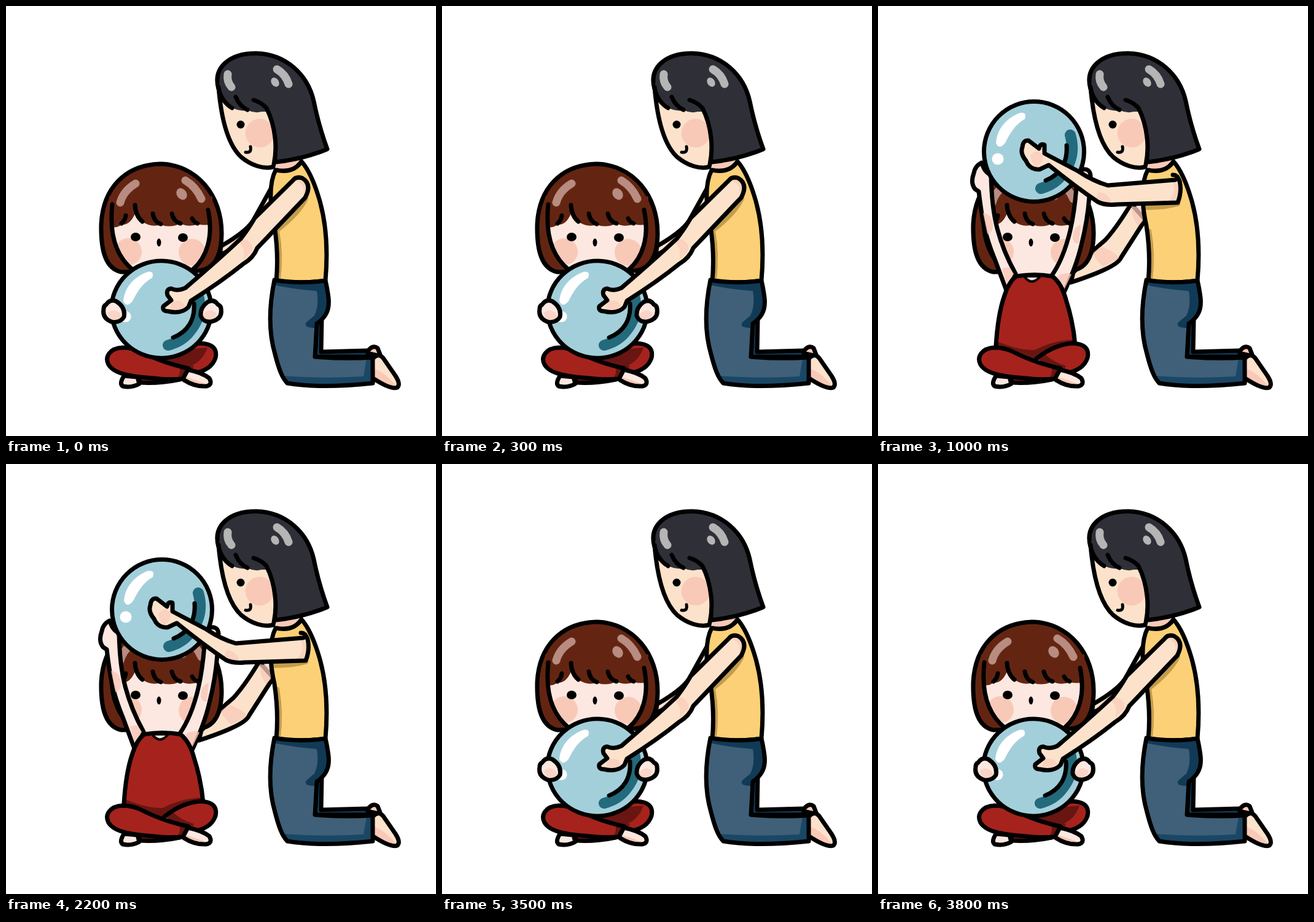
Animation, 700 px wide and 700 px high, one loop 4000 ms. Source, as an HTML page:

```html
<!DOCTYPE html>
<html lang="en">
<head>
<meta charset="utf-8">
<title>Ball lift</title>
<style>
  html, body { margin: 0; width: 100%; height: 100%; overflow: hidden; background: #fff; }
  svg { display: block; width: 100%; height: 100%; }
  path, circle, ellipse { stroke-linecap: round; stroke-linejoin: round; }
  .o { stroke: #000; stroke-width: 7; }
  .l { fill: none; stroke: #000; stroke-width: 7; }
  .skin { fill: #fde2cb; }
  .pale { fill: #fce8e0; }
  .pink { fill: #f9c9b8; }
  .hair { fill: #632512; }
  .dark { fill: #2f2f38; }
  .red { fill: #a5231c; }
  .wine { fill: #691512; }
  .shirt { fill: #fcd077; }
  .fold { fill: none; stroke: #c39c4c; stroke-width: 6; }
  .jean { fill: #3f6078; }
  .navy { fill: #113a57; }
  .shine { fill: none; stroke: #b88c80; stroke-width: 13; }
  .gloss { fill: none; stroke: #b5b5b5; stroke-width: 13; }
  .p { display: none; }
  [data-pose="0"] .p0, [data-pose="1"] .p1, [data-pose="2"] .p2 { display: inline; }
</style>
</head>
<body>
<svg id="stage" viewBox="0 0 700 700" data-pose="0">
  <defs>
    <path id="face" d="M173 322C168 370 178 407 207 430Q225 440 253 440Q286 440 303 430C327 410 338 375 329 330Z"/>
    <clipPath id="faceClip"><use href="#face"/></clipPath>
    <path id="womanFace" d="M346 132C350 180 360 225 383 246C400 260 420 266 435 262C442 235 440 198 424 166L390 140Z"/>
    <clipPath id="womanClip"><use href="#womanFace"/></clipPath>
    <path id="trousers" d="M437 446C428 490 427 530 438 567C444 590 449 605 458 614C500 621 550 619 597 614V572C570 574 540 574 503 571L506 517C522 506 527 493 525 475Q523 459 520 447Q478 453 437 446Z"/>
    <clipPath id="trouserClip"><use href="#trousers"/></clipPath>

    <g id="ball">
      <circle r="81.5" fill="#a3cfdb"/>
      <path d="M59-27Q69 8 47 36Q34 54 11 60" fill="none" stroke="#236a7c" stroke-width="18"/>
      <path d="M53-10C55 18 42 38 19 47" class="l"/>
      <path d="M-62-14C-60-38-44-55-23-63Q-11-65-15-53C-31-44-39-30-47-14Q-57-2-62-14Z" fill="#fff"/>
      <circle cx="-59" cy="12" r="9.5" fill="#fff"/>
      <circle r="81.5" class="l"/>
    </g>

    <g id="head">
      <path class="hair o" d="M188 433C162 428 154 398 155 355C158 296 194 259 251 257C310 258 352 308 351 372Q350 428 313 431Z"/>
      <use href="#face" class="pale"/>
      <g clip-path="url(#faceClip)">
        <circle class="pink" cx="199" cy="400" r="22"/>
        <circle class="pink" cx="303" cy="401" r="22"/>
      </g>
      <path class="hair" d="M168 310H336V355Q322 358 313 355Q297 361 284 354Q268 362 252 356Q236 361 222 351L210 338Q202 357 188 356Q180 362 168 360Z"/>
      <path class="l" d="M173 323C168 370 178 407 207 430M329 332C338 375 327 410 303 430M195 341Q194 349 188 354M210 324Q211 342 222 351M239 338Q241 351 252 355M270 338Q273 351 284 354M303 346Q306 352 312 354"/>
      <ellipse cx="211" cy="376" rx="8" ry="7"/>
      <ellipse cx="288" cy="377" rx="8" ry="7"/>
      <ellipse cx="249" cy="385" rx="3.5" ry="6.5"/>
      <path class="shine" d="M186 320Q191 301 211 289M292 284Q309 294 318 314"/>
      <ellipse cx="286" cy="306" rx="8" ry="10" fill="#b88c80" transform="rotate(-35 286 306)"/>
    </g>
  </defs>

  <!-- woman's far arm -->
  <g class="p p0">
    <path class="skin o" d="M438 285L402 350Q390 368 350 391L348 406Q376 392 390 375L434 330Z"/>
    <path class="pink" d="M396 364L384 377L360 393L379 377Z"/>
  </g>
  <g class="p p1">
    <path class="l" d="M438 283L420 316"/>
    <path class="skin o" d="M412 346L346 394V432L386 414Q402 386 434 345Z"/>
    <path class="pink" d="M350 408Q362 412 370 417L350 426Z"/>
  </g>
  <g class="p p2">
    <path class="skin o" d="M412 322Q389 360 370 381Q350 397 318 434L314 450Q350 438 367 430Q392 419 396 409L435 348Z"/>
    <path class="pink" d="M413 326L431 328V350L424 358Q412 345 413 326ZM362 392Q384 398 392 410Q381 418 367 424Q351 410 350 402Z" opacity=".75"/>
  </g>

  <!-- woman -->
  <g>
    <path class="pink" d="M440 258L480 250Q472 272 440 270Z"/>
    <path class="shirt" d="M439 267C427 290 430 328 437 358Q444 405 440 447Q478 453 520 447C525 390 520 345 508 308Q496 270 481 253Q468 273 439 267Z"/>
    <path class="fold" d="M442 366Q449 404 444 445"/>
    <g class="p p0"><path class="fold" style="stroke-width:12" d="M486 313Q475 336 443 361"/></g>
    <g class="p p1"><path class="fold" style="stroke-width:12" d="M484 320Q468 334 440 346"/></g>
    <g class="p p2"><path class="fold" style="stroke-width:8" d="M488 322Q468 328 437 328"/></g>
    <path class="l" d="M439 267C427 290 430 328 437 358Q444 405 440 447Q478 453 520 447C525 390 520 345 508 308Q496 270 481 253Q468 273 439 267Z"/>

    <path class="pink o" d="M587 565Q596 550 605 557L610 570Z"/>
    <path class="navy o" d="M506 513L514 510L513 563L588 561L590 571H503Z"/>
    <path class="skin" d="M598 573Q608 563 616 576L634 602Q643 616 637 621Q627 625 599 607Z"/>
    <path class="pink" d="M599 590Q616 596 634 617Q624 622 599 607Z"/>
    <path class="l" d="M598 573Q608 563 616 576L634 602Q643 616 637 621Q627 625 599 607"/>
    <use href="#trousers" class="jean"/>
    <g clip-path="url(#trouserClip)">
      <path class="navy" d="M436 443H530V525L499 524Q484 523 489 515L502 504Q510 488 506 464Q467 461 436 454Z"/>
      <path d="M448 602Q520 607 582 603L587 574H600V622H452Z" fill="#1a4766"/>
    </g>
    <use href="#trousers" class="l"/>

    <path class="dark o" d="M346 135C336 100 364 77 407 77C455 78 491 111 501 155Q509 195 523 233Q485 249 440 254L400 160Z"/>
    <use href="#womanFace" class="skin"/>
    <circle class="pink" cx="413" cy="207" r="23.5" clip-path="url(#womanClip)"/>
    <path class="dark" d="M347 125H440V172H416Q406 175 394 170Q379 172 367 165Q355 162 347 145Z"/>
    <path class="l" d="M346 132C350 180 360 225 383 246C400 260 420 266 435 262C442 235 440 198 424 166Q416 157 403 153M346 134Q351 156 368 166M374 148Q380 163 393 169"/>
    <circle cx="382" cy="193" r="6.5"/>
    <path class="l" style="stroke-width:5" d="M390 238Q400 240 398 229"/>
    <path class="gloss" d="M361 111Q359 123 367 132M441 103Q455 111 460 127"/>
    <ellipse cx="438" cy="124" rx="6" ry="8" fill="#b5b5b5" transform="rotate(-35 438 124)"/>
  </g>

  <!-- child's upper body -->
  <use href="#head" class="p p0"/>
  <g class="p p1">
    <path class="hair o" d="M159 395C147 323 176 259 250 257C317 259 355 313 351 387Z"/>
    <path class="shine" d="M188 300Q196 289 208 283M300 283Q312 290 321 300"/>
    <path class="pale" d="M161 388Q156 410 158 428Q172 447 211 466L297 463L344 431L347 382Z"/>
    <path class="pink" d="M159 414Q170 418 174 436L158 428ZM193 432L216 444L209 464L198 459ZM345 409Q333 420 327 440L345 429ZM286 445L309 438L298 464Z" opacity=".7"/>
    <path class="l" d="M159 388Q155 410 158 428Q172 447 209 466M347 382Q349 410 344 431L297 463"/>
  </g>
  <g class="p p2">
    <use href="#head"/>
    <path class="pale" d="M215 425H295L287 442Q255 434 222 441Z"/>
    <path class="pale o" d="M169 255Q158 260 156 272Q150 288 158 298L164 302C169 345 174 374 190 412L209 463L224 436Q204 400 194 362Q185 328 184 275Q173 271 169 255Z"/>
    <path class="pale o" d="M332 266Q345 264 346 276L344 310Q341 350 331 389Q323 424 301 470L282 440Q302 412 313 365Q320 335 323 295Z"/>
    <path class="pink" d="M171 337Q186 338 187 358Q187 370 178 371ZM202 427L214 425L221 436L210 457ZM330 356Q318 360 317 376Q318 389 327 386ZM292 440Q306 432 315 437L302 464Z" opacity=".8"/>
  </g>
  <g class="p p1 p2">
    <path class="red" d="M225 440Q255 435 284 440Q299 452 306 478Q318 515 321 552L256 575L192 553Q195 502 206 471Q213 449 225 440Z"/>
    <path class="wine" d="M194 546Q230 561 255 560Q286 544 320 543V556L256 577L192 556Z"/>
    <path class="l" d="M192 553Q195 502 206 471Q213 449 225 440Q255 435 284 440Q299 452 306 478Q318 515 321 552"/>
  </g>
  <path class="p p1 wine" d="M219 446H288L286 457Q255 463 219 456Z"/>
  <path class="p p2 pale o" style="stroke-width:4" d="M238 440Q250 457 264 440Z"/>

  <!-- child's legs -->
  <g>
    <path class="wine o" d="M216 600L218 613Q250 615 283 608L290 598Z"/>
    <path class="pale o" d="M192 602Q184 615 190 619Q205 622 217 615L214 604Z"/>
    <path class="red" d="M258 574Q285 552 316 549Q346 550 341 573Q334 594 303 598Z"/>
    <path class="wine" d="M258 574L272 567Q284 579 306 586L300 597Z"/>
    <path class="l" d="M258 574Q285 552 316 549Q346 550 341 573Q334 594 303 598"/>
    <path class="pale" d="M296 592Q320 597 331 606Q337 617 326 619Q307 620 290 609Z"/>
    <path class="pink" d="M291 604Q309 608 329 617Q306 621 290 609Z"/>
    <path class="l" d="M296 592Q320 597 331 606Q337 617 326 619Q307 620 290 609"/>
    <path class="red" d="M190 556C169 557 160 571 167 584C177 600 205 603 240 606Q265 609 288 607L297 590Q253 580 222 564Q207 556 190 556Z"/>
    <path class="wine" d="M282 587L297 590L288 607L277 608Q286 599 282 587Z"/>
    <path class="p p0 wine" d="M196 556Q240 580 294 588Q319 582 328 556L275 561Q235 576 196 556Z"/>
    <path class="l" d="M190 556C169 557 160 571 167 584C177 600 205 603 240 606Q265 609 288 607L297 590Q253 580 222 564Q207 556 190 556Z"/>
  </g>

  <!-- ball, child's hands, woman's near arm -->
  <g class="p p0">
    <use href="#ball" transform="translate(253 494) scale(1 .97)"/>
    <path class="pale o" d="M163 486Q170 476 180 481Q195 491 192 506Q188 514 175 515Q156 510 159 493Q159 488 163 486Z"/>
    <path class="pale o" d="M345 486Q338 476 328 482Q316 491 317 504Q321 515 333 514Q353 510 350 493Q350 488 345 486Z"/>
    <path class="pink" d="M165 500Q177 490 187 502Q188 511 176 511Q169 509 165 500ZM343 500Q331 490 321 502Q320 511 333 510Q341 508 343 500Z" opacity=".65"/>
    <path class="skin" d="M467 284L405 345Q394 364 382 379Q348 411 292 459Q278 465 269 460Q260 461 263 471L269 479L256 489Q254 497 264 497Q286 502 297 490L301 480Q350 449 386 420Q403 410 409 394L487 312Q500 292 485 280Z"/>
    <path class="pink" d="M470 284Q488 278 490 294L484 309Q488 289 470 284ZM386 379Q402 382 401 398L386 414Q391 394 379 385ZM270 482Q285 475 292 489Q281 497 267 492Z" opacity=".65"/>
    <path class="l" d="M487 312Q499 290 482 280Q472 277 467 284L405 345Q394 364 382 379Q348 411 292 459Q278 465 269 460Q260 461 263 471L269 479L256 489Q254 497 264 497Q286 502 297 490L301 480Q350 449 386 420Q403 410 409 394L487 312"/>
  </g>
  <g class="p p1">
    <use href="#ball" transform="translate(253 369) scale(.95)"/>
    <path class="pale" d="M165 362Q179 352 191 360Q201 371 195 383Q187 394 168 392Z"/>
    <path class="pink" d="M169 374Q180 363 190 374Q190 387 172 389Z" opacity=".65"/>
    <path class="l" d="M167 360Q179 353 191 360Q201 371 195 383Q187 394 168 392"/>
    <path class="pale" d="M306 371L345 366L347 389L335 392Q314 392 306 378Z"/>
    <path class="pink" d="M312 376H339Q338 387 327 387Q316 385 312 376Z" opacity=".65"/>
    <path class="l" d="M306 376Q315 393 335 392"/>
    <path class="skin" d="M467 284Q426 313 379 336L275 352L271 343Q263 334 260 349L257 354L235 357Q223 364 230 373Q240 383 263 383Q275 381 275 371L364 367Q382 366 402 356L487 313Q500 294 485 281Z"/>
    <path class="pink" d="M471 284Q489 280 490 294L485 308Q488 290 471 284ZM365 354Q379 342 393 349Q386 361 368 362ZM245 374Q261 365 271 372Q269 380 257 380Z" opacity=".65"/>
    <path class="l" d="M487 313Q499 290 482 280Q472 277 467 284Q426 313 379 336L275 352L271 343Q263 334 260 349L257 354L235 357Q223 364 230 373Q240 383 263 383Q275 381 275 371L364 367Q382 366 402 356L487 313"/>
  </g>
  <g class="p p2">
    <use href="#ball" transform="translate(254 237)"/>
    <path class="skin" d="M484 283L374 292Q350 285 326 269L271 240L271 226Q264 223 262 232L245 219Q236 218 235 230Q231 240 241 252Q247 267 263 266L278 259Q321 294 358 319Q370 325 389 323L488 320Q496 299 489 276Z"/>
    <path class="pink" d="M480 287Q490 287 489 303L485 317H473Q487 305 480 287ZM359 303Q374 303 380 319Q367 321 355 313ZM248 243Q258 231 268 242Q270 255 258 262Q250 259 248 243Z" opacity=".65"/>
    <path class="l" d="M480 275Q487 274 491 285Q495 302 488 320L389 323Q370 325 358 319Q321 294 278 259L263 266Q247 267 241 252Q231 240 235 230Q236 218 245 219L262 232Q264 223 271 226L271 240L326 269Q350 285 374 292L484 283"/>
  </g>
</svg>
<script>
  const stage = document.getElementById('stage');
  const LOOP = 4000;

  // The lift is mirrored in time: up in two steps, hold, down in two steps.
  function poseAt(t) {
    const fromEnd = Math.min(t, LOOP - t - 1e-6);
    return Math.min(2, Math.floor(fromEnd / 500));
  }

  const start = performance.now();
  function draw(now) {
    stage.dataset.pose = poseAt(Math.max(0, now - start) % LOOP);
    requestAnimationFrame(draw);
  }
  requestAnimationFrame(draw);
</script>
</body>
</html>
```
